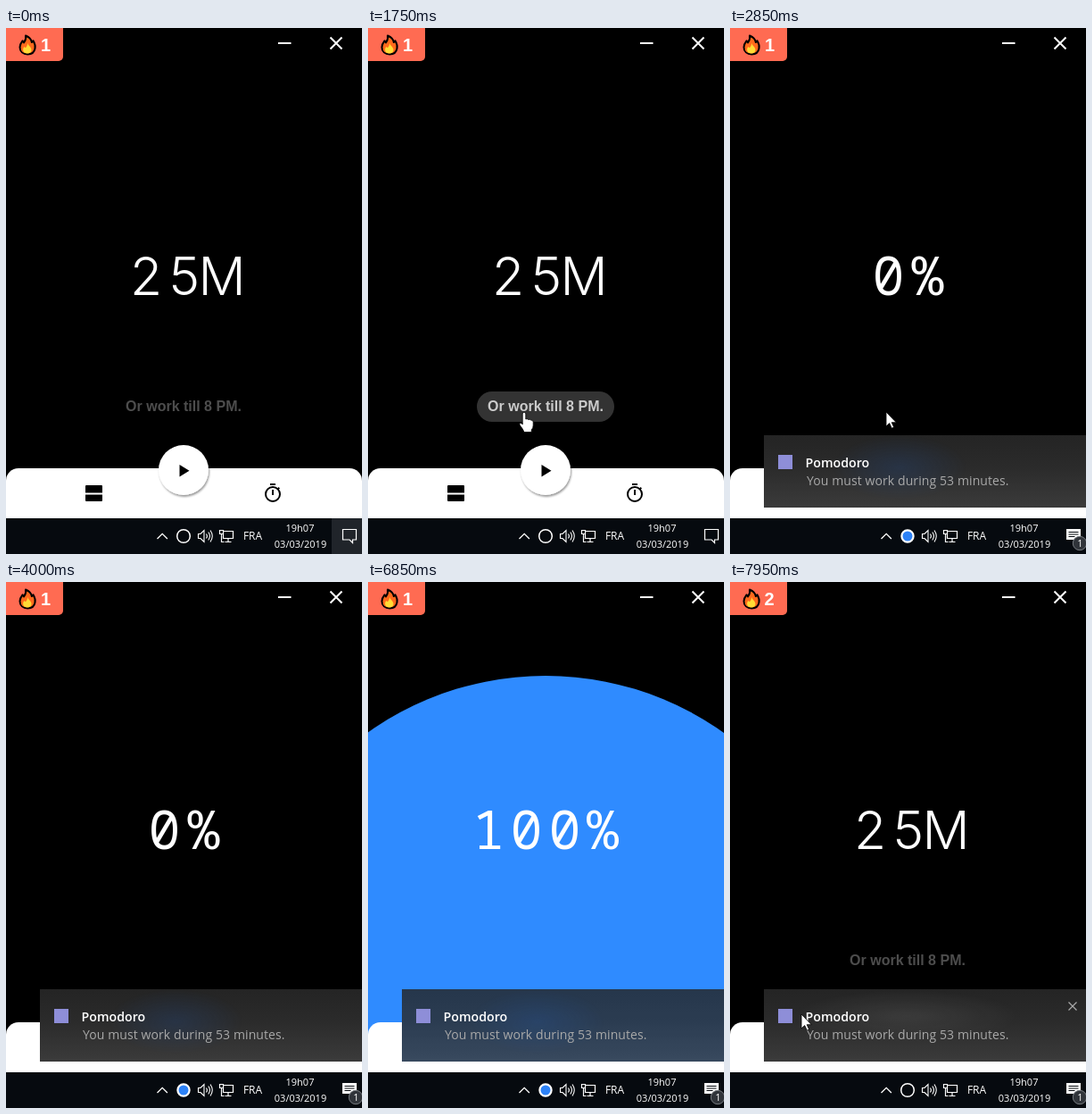
Write an HTML page that moves like this. It is 399 px wide and 589 px high and loops after 8000 ms.

```html
<!DOCTYPE html>
<html lang="en">
<head>
<meta charset="utf-8">
<title>Work timer</title>
<style>
html, body { margin: 0; width: 100%; height: 100%; overflow: hidden; background: #000; }
svg { display: block; width: 399px; height: 589px; }
text { fill: #fff; }

.big { font: 300 60px "Noto Sans Mono", monospace; text-anchor: middle; }
.wide { font: 300 59px Inter, "Open Sans", sans-serif; }
.bold { font: bold 16px "Liberation Sans", Arial, sans-serif; text-anchor: middle; }
.count { font-size: 20px; }
.ui { font: 500 11px "Open Sans", "Noto Sans", sans-serif; text-anchor: middle; }
.lang { font-size: 12px; }
.title { font: 600 14.200px "Open Sans", "Noto Sans", sans-serif; }
.body { font: 14px "Open Sans", "Noto Sans", sans-serif; letter-spacing: .09px; fill: #a9a9a9; }
.line { fill: none; stroke: #fff; }

/* Every animation shares one 8 s clock: 1% = 80 ms */
.anim { animation: 8s linear infinite; }
.hard { animation: 8s step-end infinite; }

.idle { animation-name: idle; }
.running { animation-name: running; }
.zero { animation-name: zero; }
.full { animation-name: full; }
.before { animation-name: before; }
.after { animation-name: after; }
.quiet { animation-name: quiet; }
.alert { animation-name: alert; }
.corner { animation-name: corner; }
.hovered { animation-name: hovered; }
.pill { animation-name: pill; }
.till { animation-name: till; }
.wave { animation-name: wave; }
.tint { animation-name: tint; }
.toast { animation-name: toast; }
.cursor { animation-name: move; }
.pointer { animation-name: show; }
.arrow { animation-name: arrow; }
.hand { animation-name: hand; }

@keyframes idle { 0%, 90% { opacity: 1 } 27.5% { opacity: 0 } }
@keyframes running { 0%, 90% { opacity: 0 } 27.5% { opacity: 1 } }
@keyframes zero { 0%, 83.75% { opacity: 0 } 27.5% { opacity: 1 } }
@keyframes full { 0%, 90% { opacity: 0 } 83.75% { opacity: 1 } }
@keyframes before { 0% { opacity: 1 } 90% { opacity: 0 } }
@keyframes after { 0% { opacity: 0 } 90% { opacity: 1 } }
@keyframes quiet { 0% { opacity: 1 } 28.125% { opacity: 0 } }
@keyframes alert { 0% { opacity: 0 } 28.125% { opacity: 1 } }
@keyframes corner { 0% { opacity: 1 } 2.5% { opacity: 0 } }
@keyframes hovered { 0% { opacity: 0 } 98.75% { opacity: 1 } }
@keyframes show { 0%, 50% { opacity: 0 } 1.25%, 97.5% { opacity: 1 } }
@keyframes arrow { 0%, 15%, 27.5% { opacity: 1 } 10%, 17.5% { opacity: 0 } }
@keyframes hand { 0%, 15%, 27.5% { opacity: 0 } 10%, 17.5% { opacity: 1 } }

@keyframes pill {
  0%, 17.5% { opacity: 0; animation-timing-function: ease }
  21.875%, 27.5% { opacity: 1 }
  30%, 100% { opacity: 0 }
}
@keyframes till {
  0%, 17.5% { fill-opacity: .3; animation-timing-function: ease }
  21.875%, 27.5% { fill-opacity: .75 }
  30%, 90% { fill-opacity: .15 }
  93.125%, 100% { fill-opacity: .3 }
}
@keyframes wave {
  0%, 83.75% { transform: scale(0) }
  84.375% { transform: scale(.45) }
  85% { transform: scale(1.2) }
  85.625% { transform: scale(2.3) }
  86.25%, 89.375% { transform: scale(3.4) }
  90% { transform: scale(2.2) }
  90.625% { transform: scale(1) }
  91.25% { transform: scale(.5) }
  91.875% { transform: scale(.22) }
  92.5% { transform: scale(.08) }
  93.125%, 100% { transform: scale(0) }
}
@keyframes tint {
  0%, 83.75% { opacity: 0 }
  86.25%, 89.375% { opacity: .24 }
  90.625% { opacity: .12 }
  93.125%, 100% { opacity: 0 }
}
@keyframes toast {
  0%, 28.125% { transform: translate(399px, 456px); animation-timing-function: cubic-bezier(.1, .9, .2, 1) }
  35.625%, 100% { transform: translate(38px, 456px) }
}
@keyframes move {
  0%, 1.25% { transform: translate(392px, 584px) }
  5% { transform: translate(300px, 545px) }
  11.25% { transform: translate(198px, 501px) }
  15% { transform: translate(185px, 467px) }
  17.5% { transform: translate(178px, 441px) }
  20%, 46.25% { transform: translate(175px, 430px) }
  49.375% { transform: translate(160px, 171px) }
  60%, 97.5% { transform: translate(15px, 399px) }
  99.375%, 100% { transform: translate(80px, 484px) }
}
</style>
</head>
<body>
<svg viewBox="0 0 399 589">
  <defs>
    <linearGradient id="panel" x2="0" y2="1">
      <stop stop-color="#242424"/>
      <stop offset=".45" stop-color="#2b2b2b"/>
      <stop offset="1" stop-color="#3b3b3b"/>
    </linearGradient>
    <radialGradient id="glow">
      <stop stop-color="#1f4f9a" stop-opacity=".24"/>
      <stop offset="1" stop-color="#1f4f9a" stop-opacity="0"/>
    </radialGradient>
    <radialGradient id="light">
      <stop stop-color="#fff" stop-opacity=".08"/>
      <stop offset="1" stop-color="#fff" stop-opacity="0"/>
    </radialGradient>
    <filter id="shade" x="-20%" y="-20%" width="150%" height="150%">
      <feDropShadow dx="1" dy="2" stdDeviation="1.2" flood-opacity=".4"/>
    </filter>
  </defs>

  <rect width="399" height="589"/>

  <g transform="translate(199 450)"><circle class="anim wave" r="150" fill="#2f8bff"/></g>

  <!-- streak badge -->
  <path d="M0 0H64V32a5 5 0 0 1-5 5H0z" fill="#ff6b52"/>
  <path d="M22 8.500c5 2 6.500 5 6.800 7.500l1.700-1.800c2 3.200 2.500 6 2 8.800-.8 4.300-4 6.500-8.300 6.500-5 0-8.700-3-8.700-8 0-3 1.300-5 3-7.200l1.500 2.200c1.800-2.300 2.700-4.700 2-8z" fill="#ff6a1c" stroke="#000" stroke-width="2" stroke-linejoin="round"/>
  <path d="M24 16.500c.3 3 4.500 4.500 4.500 8 0 2.500-1.900 4-4.500 4s-4.900-1.400-4.900-4c0-1.500.6-2.600 1.500-3.600l1.300 1.300c1.700-1.500 2.300-3.400 2.100-5.700z" fill="#ffdc35"/>
  <text class="bold count hard before" x="44.500" y="26">1</text>
  <text class="bold count hard after" x="44" y="26">2</text>

  <path class="line" d="M305 17H319.500M363.500 10.500l13 13m0-13l-13 13" stroke-width="2"/>

  <!-- timer -->
  <g class="hard idle">
    <text class="big wide" x="157 200 242" y="299">25M</text>
    <rect class="anim pill" x="122" y="407" width="154" height="34" rx="17" fill="#333"/>
    <text class="bold anim till" x="199" y="429">Or work till 8 PM.</text>
  </g>
  <text class="big hard zero" x="177.500 221.500" y="299">0%</text>
  <text class="big hard full" x="135 177.500 220.500 263" y="299">100%</text>

  <!-- bottom bar -->
  <rect y="493" width="399" height="70" rx="14" fill="#fff"/>
  <g class="hard idle">
    <path d="M90 512h17a1 1 0 0 1 1 1v7.500H89V513a1 1 0 0 1 1-1zM89 522.500h19v6.500a1 1 0 0 1-1 1H90a1 1 0 0 1-1-1z"/>
    <g fill="none" stroke="#000" stroke-width="2">
      <circle cx="299" cy="522" r="8"/>
      <path d="M296 511h6M299 517v6M304.500 516.500l1.800-1.800"/>
    </g>
    <circle cx="199" cy="495" r="28" fill="#fff" filter="url(#shade)"/>
    <path d="M194.500 489v13.500l11-6.750z"/>
  </g>

  <!-- taskbar -->
  <rect y="549" width="399" height="40" fill="#060a0f"/>
  <rect class="hard corner" x="365" y="549" width="34" height="40" fill="#20242a"/>
  <path class="line" d="M169.500 572l5.700-5.700 5.700 5.700" stroke-width="1.300"/>
  <circle class="line hard idle" cx="199" cy="569" r="7.300" stroke-width="1.500"/>
  <circle class="hard running" cx="199" cy="569" r="6.600" fill="#2d82f7" stroke="#fff" stroke-width="2.200"/>
  <path class="line" d="M215.500 566.500h2.500l4-4v13l-4-4h-2.500zM224.500 566.500q1.800 2.500 0 5M226.800 564.500q3.200 4.500 0 9M229 562.500q4.500 6.500 0 13" stroke-width="1.100"/>
  <path class="line" d="M243.500 563.500h11v8h-11zM249 571.500v3.500M245.500 575.500h7M239.500 562.500h4v4h-4zM241.500 566.500v9h3" stroke-width="1.200"/>
  <text class="ui lang" x="276.500" y="573">FRA</text>
  <text class="ui" x="329.500" y="564">19h07</text>
  <text class="ui" x="330" y="582">03/03/2019</text>
  <path class="line hard quiet" d="M377.500 561.500h15v11.500h-4v3.500l-3.500-3.500h-7.500z" stroke-width="1.200"/>
  <g class="hard alert">
    <path d="M377 561h16v12h-4.500v4l-4-4H377z" fill="#fff"/>
    <path d="M379.500 564.500h11M379.500 567h11M379.500 569.500h7" stroke="#060a0f"/>
    <circle cx="392" cy="577" r="7.700" fill="#30343a" stroke="#777b80"/>
    <text class="ui" x="392.500" y="581">1</text>
  </g>

  <!-- notification -->
  <g class="anim toast">
    <rect width="362" height="81" fill="url(#panel)"/>
    <ellipse class="hard running" cx="152" cy="36" rx="75" ry="36" fill="url(#glow)"/>
    <rect class="anim tint" width="362" height="81" fill="#2d8aff"/>
    <g class="hard hovered">
      <ellipse cx="160" cy="30" rx="130" ry="30" fill="url(#light)"/>
      <path d="M341.500 14.500l9 9m0-9l-9 9" stroke="#aaa" stroke-width="1.200"/>
    </g>
    <rect x="16" y="22" width="16" height="16" fill="#8e8ed8"/>
    <text class="title" x="46.500" y="36">Pomodoro</text>
    <text class="body" x="48" y="56">You must work during 53 minutes.</text>
  </g>

  <g class="hard pointer">
    <g class="anim cursor" fill="#fff" stroke="#000" stroke-width=".8">
      <path class="hard arrow" d="M0 0V16l3.700-3.400 2.600 5.600 2.400-1.100-2.500-5.400H11.300z"/>
      <path class="hard hand" d="M-1.800 2a1.800 1.800 0 0 1 3.600 0V8q1.600-.9 2.900.5 1.700-.8 2.900.6 2.600-.4 2.600 2.400V15q0 3-2 5v2.500H0q-1-3-4.600-7.400-1.400-2.400.6-2.800 1.200 0 2.200 1.600z"/>
    </g>
  </g>
</svg>
<script>
// Advance the shared clock in 50 ms ticks; the small offset lands just past each keyframe.
const LOOP = 8000, TICK = 50, OFFSET = 0.01;
const clips = document.getAnimations();
const start = performance.now();
clips.forEach(clip => clip.pause());

function draw() {
  const time = (performance.now() - start) % LOOP;
  const tick = Math.floor(time / TICK) * TICK + OFFSET;
  clips.forEach(clip => { clip.currentTime = tick; });
  requestAnimationFrame(draw);
}
draw();
</script>
</body>
</html>
```
